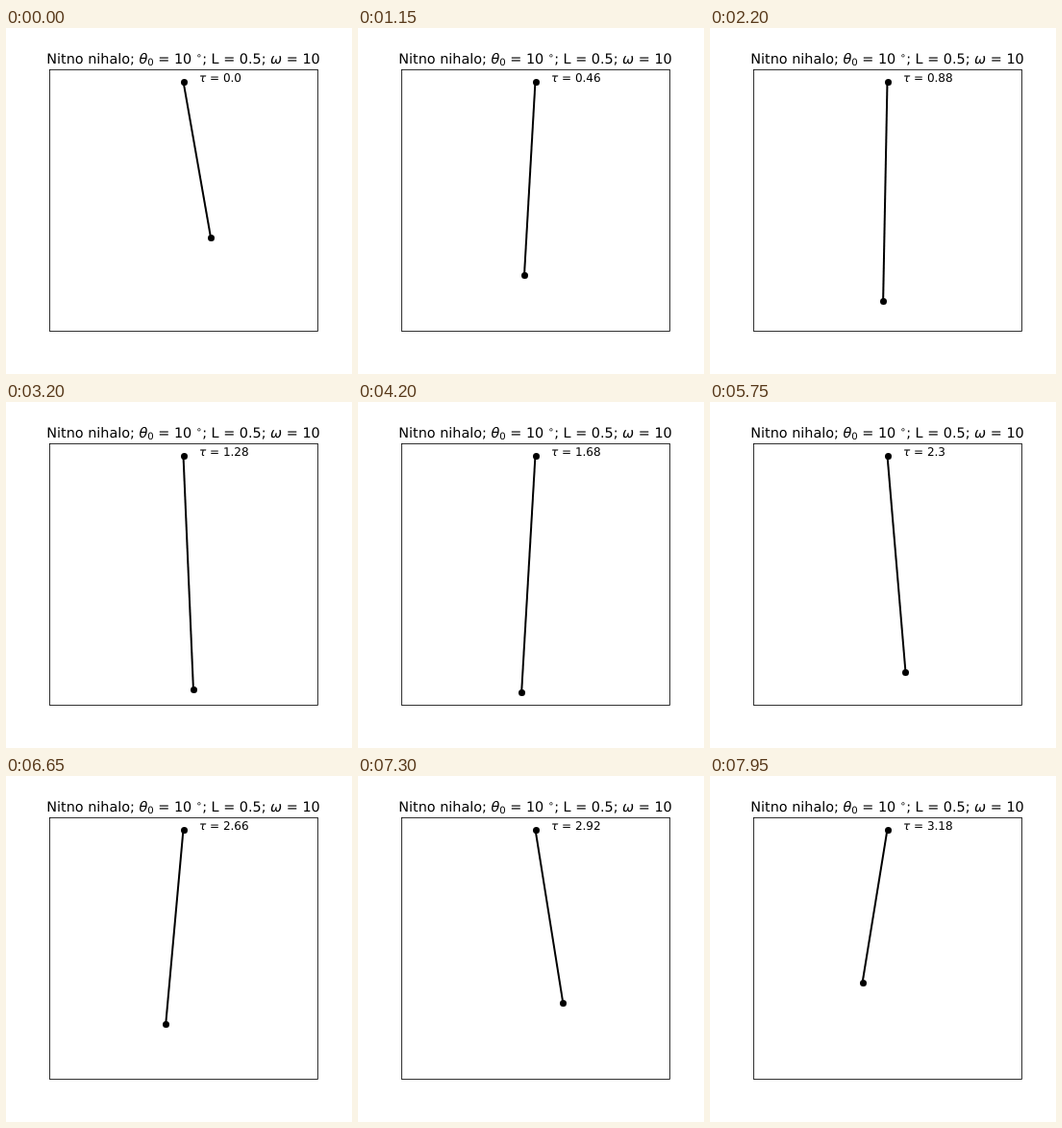
Animation of 360x360 px, one loop 8000 ms. Source, as an HTML page:

```html
<!DOCTYPE html>
<html lang="sl">
<head>
<meta charset="utf-8">
<style>
  html, body { margin: 0; width: 100%; height: 100%; overflow: hidden; background: #fff; }
  svg { display: block; width: 100vw; height: 100vh; }
  text { font-family: "DejaVu Sans", sans-serif; text-rendering: geometricPrecision; white-space: pre; }
  .var { font-style: italic; }
  .small { font-size: 10.08px; }
</style>
</head>
<body>
<svg viewBox="0 0 360 360">
  <rect x="45.5" y="43.5" width="279" height="272" fill="none" stroke="#000" stroke-width=".8"/>
  <text x="184.5" y="37" font-size="14.4" text-anchor="middle">Nitno nihalo; <tspan class="var">θ</tspan><tspan class="small" dy="2.4">0</tspan><tspan dy="-2.4"> = 10 </tspan><tspan class="small" dy="-5">∘</tspan><tspan dy="5">; L = 0.5; </tspan><tspan class="var">ω</tspan> = 10</text>
  <text x="201" y="56" font-size="12"><tspan class="var">τ</tspan><tspan id="time"></tspan></text>
  <line id="rod" x1="184.5" y1="55.55" stroke="#000" stroke-width="2"/>
  <circle cx="185.5" cy="56.5" r="3.5"/>
  <circle id="bob" r="3.5"/>
</svg>
<script>
const STEP_MS = 50, STEPS = 160, DTAU = 0.02;
const OMEGA = 10, STRETCH = 0.5;
const PIVOT = { x: 184.5, y: 55.55 }, SCALE = { x: 164.12, y: 164.73 };
const [label, rod, bob] = ["time", "rod", "bob"].map(id => document.getElementById(id));

const ropeLength = tau => 1 + STRETCH * Math.sin(tau);

// Pendulum with a rope of changing length: returns [θ', θ''].
function slope(tau, [theta, speed]) {
  const pull = 2 * STRETCH * Math.cos(tau) * speed + OMEGA ** 2 * Math.sin(theta);
  return [speed, -pull / ropeLength(tau)];
}

function rungeKutta(tau, state, h) {
  const shift = (k, f) => state.map((v, i) => v + k[i] * f);
  const a = slope(tau, state);
  const b = slope(tau + h / 2, shift(a, h / 2));
  const c = slope(tau + h / 2, shift(b, h / 2));
  const d = slope(tau + h, shift(c, h));
  return state.map((v, i) => v + h / 6 * (a[i] + 2 * b[i] + 2 * c[i] + d[i]));
}

const angles = [];
let state = [10 * Math.PI / 180, 0];
for (let n = 0; n < STEPS; n++) {
  angles.push(state[0]);
  for (let k = 0; k < 4; k++) state = rungeKutta((n + k / 4) * DTAU, state, DTAU / 4);
}

// Dots sit on whole pixels, the rod does not.
const snap = v => Math.floor(v + 0.5) + 0.5;

function draw() {
  const n = Math.floor(performance.now() / STEP_MS) % STEPS;
  const tau = n * DTAU, length = ropeLength(tau);
  const x = PIVOT.x + SCALE.x * length * Math.sin(angles[n]);
  const y = PIVOT.y + SCALE.y * length * Math.cos(angles[n]);
  rod.setAttribute("x2", x);
  rod.setAttribute("y2", y);
  bob.setAttribute("cx", snap(x));
  bob.setAttribute("cy", snap(y));
  label.textContent = " = " + tau.toFixed(n % 5 ? 2 : 1);
  requestAnimationFrame(draw);
}
draw();
</script>
</body>
</html>
```
